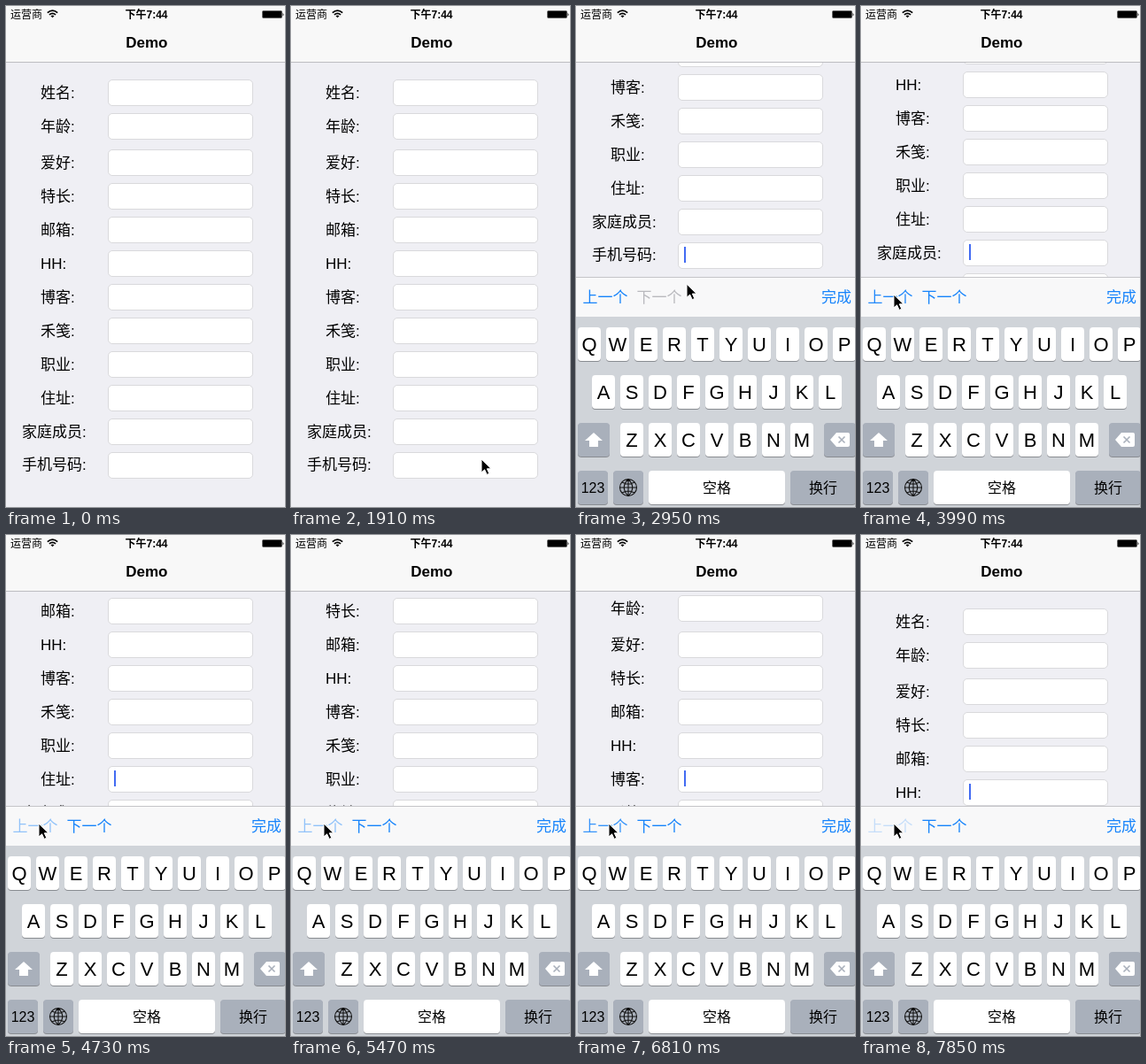
Animation, 315 px wide and 566 px high, one loop 8 s. Source, as an HTML page:

```html
<!DOCTYPE html>
<html lang="zh">
<head>
<meta charset="utf-8">
<style>
html, body { margin: 0; width: 100%; height: 100%; overflow: hidden; background: #efeff4; }
svg { display: block; width: 315px; height: 566px; }
text { font-family: "Liberation Sans", "Noto Sans CJK SC", "Noto Sans CJK", sans-serif; font-size: 17px; fill: #000; }
.mid { text-anchor: middle; }
.status { font-size: 12px; }
.bold { font-weight: bold; }
.link { fill: #1583fb; }
.letter { font-size: 22px; }
.word { font-size: 16px; }
</style>
</head>
<body>
<svg id="stage" viewBox="0 0 315 566">
  <rect width="315" height="566" fill="#efeff4"/>
  <g id="form"></g>
  <g id="nav">
    <rect width="315" height="63" fill="#f8f8f8"/>
    <rect y="63" width="315" height="1" fill="#bdbdc1"/>
    <text class="status" x="5" y="13.5">运营商</text>
    <g fill="none" stroke="#000" stroke-width="1.7">
      <path d="M46.8 7.6Q52.5 2.8 58.2 7.6M48.9 9.9Q52.5 6.9 56.1 9.9"/>
      <path d="M50.5 11.2Q52.5 9.6 54.5 11.2L52.5 13.2Z" fill="#000" stroke="none"/>
    </g>
    <text class="status bold mid" x="158.5" y="13.5">下午7:44</text>
    <rect x="289.5" y="5.5" width="22" height="8" rx="1" fill="#000" stroke="#555" stroke-width=".6"/>
    <path d="M312.5 7.5q1.8 2 0 4z"/>
    <text class="bold mid" x="158.8" y="47">Demo</text>
  </g>
  <g id="keyboard">
    <rect y="306" width="315" height="45" fill="#f8f8f9"/>
    <rect y="306" width="315" height="1" fill="#c4c4c8"/>
    <rect y="351" width="315" height="215" fill="#d0d4d9"/>
    <text id="prev" class="link" x="7.5" y="335">上一个</text>
    <text id="next" class="link" x="68.5" y="335">下一个</text>
    <text class="link" x="277" y="335">完成</text>
    <g id="keys"></g>
  </g>
  <path id="cursor" d="M0 0V15L3.6 11.8L6.2 17.4L8.8 16.2L6.3 10.8H11Z" fill="#000" stroke="#fff" stroke-width="1"/>
</svg>
<script>
const LOOP = 8000, STEP = 148.3;
const $ = id => document.getElementById(id);

function add(parent, tag, attrs, text) {
  const el = document.createElementNS("http://www.w3.org/2000/svg", tag);
  for (const name in attrs) el.setAttribute(name, attrs[name]);
  if (text) el.textContent = text;
  return parent.appendChild(el);
}

// Form rows
const labels = ["姓名", "年龄", "爱好", "特长", "邮箱", "HH", "博客", "禾笺", "职业", "住址", "家庭成员", "手机号码"];
const rowTop = i => i < 2 ? 83 + 38 * i : 86 + 38 * i;
const form = $("form");
labels.forEach((label, i) => {
  const y = rowTop(i);
  add(form, "text", { x: label.length > 2 ? 18 : 39, y: y + (i === 11 ? 20 : 21) }, label + ":");
  add(form, "rect", { x: 115.5, y: y + .5, width: 163, height: 29, rx: 4.5, fill: "#fff", stroke: "#d9d9dc" });
});
const caret = add(form, "rect", { x: 122, width: 2, height: 18, fill: "#426bf2" });

// Keyboard
const keys = $("keys");
function key(x, y, width, label, style, dark) {
  const box = { x, width, height: 38, rx: 4 };
  add(keys, "rect", { ...box, y: y + 1, fill: "#898c91" });
  add(keys, "rect", { ...box, y, fill: dark ? "#a9b0bb" : "#fff" });
  if (label) add(keys, "text", { class: "mid " + style, x: x + width / 2, y: y + (style === "letter" ? 27 : 25) }, label);
}
[["QWERTYUIOP", 2], ["ASDFGHJKL", 18], ["ZXCVBNM", 50]].forEach(([row, x], r) =>
  [...row].forEach((c, i) => key(x + 32 * i, 363 + 54 * r, 26, c, "letter")));
key(2, 471, 36, "", "", true);
key(280, 471, 36, "", "", true);
key(2, 525, 34, "123", "word", true);
key(42, 525, 34, "", "", true);
key(82, 525, 154, "空格", "word");
key(242, 525, 74, "换行", "word", true);
add(keys, "path", { d: "M20 482L30 491H25V498H15V491H10Z", fill: "#fff" });
add(keys, "path", { d: "M287 490L294 482H307Q309 482 309 484V496Q309 498 307 498H294Z", fill: "#fff" });
add(keys, "path", { d: "M296.5 486.5L303.5 493.5M303.5 486.5L296.5 493.5", stroke: "#a9b0bb", "stroke-width": 1.6 });
add(keys, "path", {
  d: "M49.5 544a9.5 9.5 0 1 0 19 0a9.5 9.5 0 1 0-19 0H68.5M59 534.5V553.5M59 534.5Q49.5 544 59 553.5Q68.5 544 59 534.5M52 538Q59 542 66 538M52 550Q59 546 66 550",
  fill: "none", stroke: "#111", "stroke-width": 1.1
});

// Focus changes: time, row, scroll offset
const focuses = [
  [2060, 11, 237], [3550, 10, 202], [4250, 9, 167], [4800, 8, 129],
  [5600, 7, 91], [6450, 6, 53], [7480, 5, 0]
];
const touches = [...focuses.slice(1).map(f => f[0]), 7900];

// Pointer: time, x, y
const pointerPath = [
  [140, 289, 117], [290, 281, 190], [440, 270, 260], [590, 235, 320], [735, 205, 400],
  [880, 180, 465], [1030, 190, 490], [1175, 213, 504], [1330, 213, 513], [1620, 215, 512],
  [2360, 215, 512], [2660, 165, 400], [2950, 127, 314], [3300, 37, 326]
];

const clamp = x => Math.max(0, Math.min(1, x));
const ease = x => { x = clamp(x); return x * x * (3 - 2 * x); };

function pointerAt(t) {
  const i = pointerPath.findIndex(p => p[0] > t);
  if (i < 0) return pointerPath.at(-1).slice(1);
  const [t0, x0, y0] = pointerPath[i - 1] || pointerPath[0], [t1, x1, y1] = pointerPath[i];
  const k = t1 > t0 ? (t - t0) / (t1 - t0) : 0;
  return [x0 + (x1 - x0) * k, y0 + (y1 - y0) * k];
}

function touchOpacity(t) {
  return Math.min(...touches.map(p => {
    const d = t - p;
    if (d < -150 || d > 500) return 1;
    return d < 0 ? .45 : .45 + .55 * clamp(d / 500);
  }), t > 7800 ? .22 : 1);
}

function render(time) {
  // The screen refreshes in coarse steps.
  const t = time < 140 ? 0 : 140 + STEP * Math.floor((time - 128) / STEP);
  let scroll = 0, current = null;
  for (const f of focuses) {
    if (t < f[0]) break;
    scroll += (f[2] - scroll) * ease((t - f[0]) / (current ? 330 : 440));
    current = f;
  }
  form.setAttribute("transform", `translate(0 ${-Math.round(scroll)})`);
  $("keyboard").setAttribute("transform", `translate(0 ${260 * (1 - ease((t - 2060) / 440))})`);
  $("keyboard").setAttribute("visibility", current ? "visible" : "hidden");

  const blinkOn = current && (t - current[0]) % 1000 < 600;
  caret.setAttribute("visibility", blinkOn || (current && current[1] === 11) ? "visible" : "hidden");
  if (current) caret.setAttribute("y", rowTop(current[1]) + 5);

  $("prev").setAttribute("opacity", touchOpacity(t));
  $("next").style.fill = current && current[1] < 11 ? "" : "#b9b9be";

  const [x, y] = pointerAt(t);
  $("cursor").setAttribute("transform", `translate(${x} ${y})`);
  $("cursor").setAttribute("visibility", t < 140 ? "hidden" : "visible");
}

const start = performance.now();
function tick() {
  render((performance.now() - start) % LOOP);
  requestAnimationFrame(tick);
}
tick();
</script>
</body>
</html>
```
